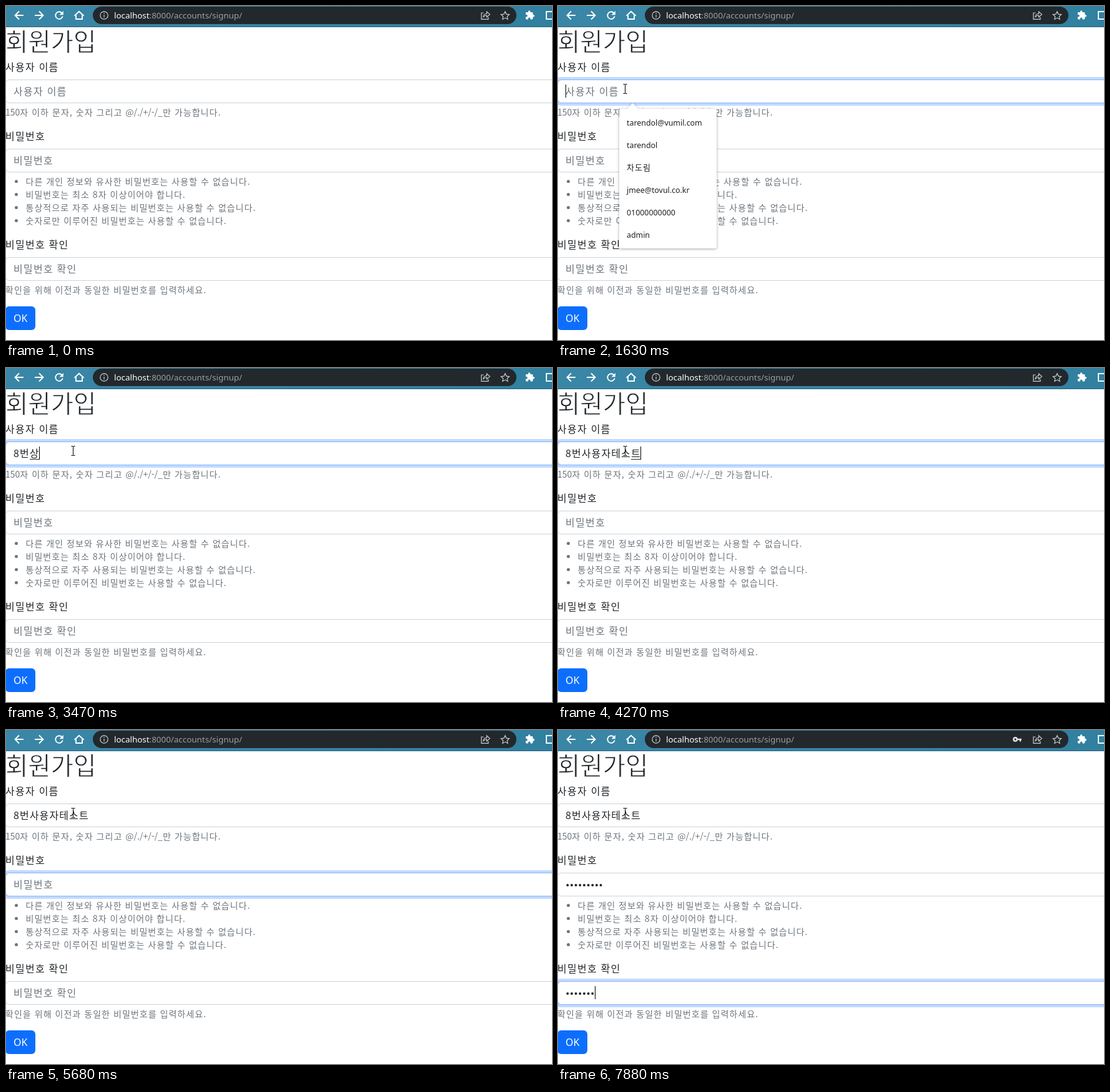
Animation of 874 by 536 pixels, one loop 8000 ms. Source, as an HTML page:

```html
<!DOCTYPE html>
<html lang="ko">
<head>
<meta charset="utf-8">
<title>회원가입</title>
<style>
  html, body { margin: 0; width: 100%; height: 100%; overflow: hidden; background: #fff; }
  svg { display: block; }
  text { font-family: "Noto Sans CJK KR", "Noto Sans CJK", sans-serif; white-space: pre; }
  /* the white outline thins the heavy strokes */
  .title { font-size: 39.5px; font-weight: 300; fill: #212529; stroke: #fff; stroke-width: .9; }
  .label, .hint, .value { font-size: 16px; letter-spacing: 1.25px; fill: #212529; }
  .hint { fill: #6c757d; }
  .value { letter-spacing: 1.1px; }
  .help { font-size: 14px; letter-spacing: 1.04px; fill: #6c757d; }
  .tight { letter-spacing: 0; }
  .latin { font-family: "Noto Sans", sans-serif; }
  .url { font-size: 13.4px; fill: #9aa0a6; }
  .item { font: 12.4px "Noto Sans", "Noto Sans CJK KR", sans-serif; fill: #202124; }
  .item.ko { font-size: 13px; letter-spacing: 1px; }
  .line { fill: none; stroke: #fff; stroke-width: 1.9; }
  .thin { fill: none; stroke: #c9cdd1; stroke-width: 1.2; }
  #menu { filter: drop-shadow(0 1px 2px rgba(0, 0, 0, .35)); }
</style>
</head>
<body>
<svg id="stage" width="874" height="536" viewBox="0 0 874 536">
  <defs>
    <linearGradient id="bar">
      <stop offset="0" stop-color="#3a86a6"/>
      <stop offset="1" stop-color="#31809f"/>
    </linearGradient>
  </defs>

  <g id="browser">
    <rect width="874" height="34" fill="url(#bar)"/>
    <rect y="33" width="874" height="1" fill="#24627c"/>
    <rect x="139" y="1" width="678" height="28" rx="14" fill="#22282c"/>
    <path class="line" d="M28 15H15M21 8.5L14.500 15l6.500 6.500M46 15h13M53 8.500l6.500 6.500-6.500 6.500"/>
    <path class="line" d="M89.500 11.300A5.800 5.800 0 1 0 90.700 16.500"/>
    <path d="M91.800 8v6.300h-6.300z" fill="#fff"/>
    <path class="line" d="M109.500 15.800L117 8.800l7.500 7M112 14.500V21h10v-6.500"/>
    <circle class="thin" cx="157" cy="15" r="6.2"/>
    <path class="thin" d="M157 14v4.500M157 11v1.600"/>
    <text class="latin url" x="173" y="20"><tspan fill="#fff">localhost</tspan>:8000/accounts/signup/</text>
    <path class="thin" d="M764.500 11H761v10.300h11V18M763.800 18.300c.5-4 2.700-6 5.700-6V9l5 4.500-5 4.500v-3c-2.500 0-4.300 1-5.700 3.300z"/>
    <path class="thin" d="M799 8.800l2 4.300 4.600.5-3.400 3.200.9 4.600-4.100-2.300-4.100 2.300.9-4.600-3.400-3.200 4.600-.5z"/>
    <path fill="#fff" transform="translate(830.5 6.5) scale(.68)" d="M20.500 11H19V7c0-1.100-.9-2-2-2h-4V3.500a2.500 2.500 0 0 0-5 0V5H4c-1.100 0-2 .9-2 2v3.800h1.500a2.700 2.700 0 0 1 0 5.400H2V20c0 1.100.9 2 2 2h3.800v-1.500a2.700 2.700 0 0 1 5.400 0V22H17c1.100 0 2-.9 2-2v-4h1.500a2.500 2.500 0 0 0 0-5z"/>
    <rect class="line" x="865" y="9" width="14" height="12"/>
    <g id="key" fill="none" stroke="#dfe2e5" stroke-width="2.4">
      <circle cx="732" cy="15" r="2.7"/>
      <path d="M735 15h7M740 15v3.500"/>
    </g>
  </g>

  <g id="page">
    <text class="title" x="-1" y="71.5">회원가입</text>
    <text class="help" x="-1" y="176"><tspan class="tight">150</tspan>자 이하 문자, 숫자 그리고 <tspan class="tight">@/./+/-/_</tspan>만 가능합니다.</text>
    <text class="help" x="-1" y="461">확인을 위해 이전과 동일한 비밀번호를 입력하세요.</text>
    <rect x="-1" y="482" width="48" height="38" rx="6" fill="#0d6efd"/>
    <text class="latin" x="12" y="507" font-size="16" fill="#fff">OK</text>
  </g>

  <g id="fields"></g>
  <rect id="under" y="146" width="15" height="1" fill="#212529"/>
  <rect id="caret" width="1" height="21" fill="#000"/>

  <g id="menu">
    <rect x="98" y="165" width="156" height="224" rx="3" fill="#fff"/>
    <path d="M110 165.500l9.500-9.500 9.500 9.500z" fill="#fff"/>
  </g>

  <path id="arrow" d="M0 0v16.500l3.800-3.600 2.500 5.800 2.400-1-2.500-5.700h5.300z" fill="#fff" stroke="#000"/>
  <path id="beam" d="M-3-7.500h2.500l.5.500.5-.5h2.500M0-7v14M-3 7.500h2.500l.5-.5.5.500h2.500" fill="none" stroke="#000"/>
</svg>

<script>
const $ = id => document.getElementById(id);
const LOOP = 8000, DOT = 6.65, LEFT = 12;

function add(parent, tag, attrs, text = '') {
  const el = document.createElementNS('http://www.w3.org/2000/svg', tag);
  for (const k in attrs) el.setAttribute(k, attrs[k]);
  el.textContent = text;
  return parent.appendChild(el);
}
const show = (el, on) => el.setAttribute('visibility', on ? 'visible' : 'hidden');

// Form fields
const fields = [['사용자 이름', 118], ['비밀번호', 229], ['비밀번호 확인', 403]].map(([name, y]) => {
  const g = $('fields');
  const box = { x: -.5, y: y + .5, width: 900, height: 37, rx: 5.5 };
  add(g, 'text', { class: 'label', x: -1, y: y - 14 }, name);
  add(g, 'rect', { ...box, fill: '#fff', stroke: '#ced4da' });
  const glow = add(g, 'g', { fill: 'none' });
  add(glow, 'rect', { x: -3, y: y - 2, width: 904, height: 42, rx: 8, stroke: '#0d6efd', 'stroke-opacity': .25, 'stroke-width': 4 });
  add(glow, 'rect', { ...box, stroke: '#86b7fe' });
  const hint = add(g, 'text', { class: 'hint', x: LEFT, y: y + 25 }, name);
  const value = add(g, 'text', { class: 'value', x: LEFT, y: y + 25 });
  const dots = Array.from({ length: 9 }, (_, i) =>
    add(g, 'circle', { cx: LEFT + DOT * (i + .5), cy: y + 20, r: 2, fill: '#212529' }));
  return { y, glow, hint, value, dots };
});

// Password rules
['다른 개인 정보와 유사한 비밀번호는 사용할 수 없습니다.',
 '비밀번호는 최소 8자 이상이어야 합니다.',
 '통상적으로 자주 사용되는 비밀번호는 사용할 수 없습니다.',
 '숫자로만 이루어진 비밀번호는 사용할 수 없습니다.'].forEach((rule, i) => {
  const y = 287 + 21 * i;
  add($('page'), 'circle', { cx: 16.5, cy: y - 5.5, r: 2.5, fill: '#6c757d' });
  add($('page'), 'text', { class: 'help', x: 31.5, y }, rule);
});

['tarendol@vumil.com', 'tarendol', '차도림', 'jmee@tovul.co.kr', '01000000000', 'admin'].forEach((s, i) =>
  add($('menu'), 'text', { class: /[가-힣]/.test(s) ? 'item ko' : 'item', x: 110, y: 192 + 36 * i }, s));

// Each step changes only the listed parts of the state.
const start = { mouse: null, beam: false, glow: [0, 0, 0], focus: -1, name: '', compose: false, dots: [0, 0, 0], key: false, menu: false, caret: true };
const steps = [
  [0, {}],
  [600, { mouse: [380, 366] }],
  [800, { mouse: [215, 222] }],
  [1020, { mouse: [107, 133], beam: true }],
  [1430, { focus: 0, glow: [.7, 0, 0] }],
  [1630, { glow: [1, 0, 0], menu: true }],
  [2030, { name: '8', menu: false }],
  [2230, { name: '8ㅂ', compose: true }],
  [2430, { name: '8버' }],
  [2830, { name: '8번' }],
  [3030, { name: '8번ㅅ' }],
  [3270, { name: '8번사' }],
  [3470, { name: '8번상' }],
  [3670, { name: '8번사용' }],
  [3870, { name: '8번사용자테' }],
  [4070, { name: '8번사용자테스' }],
  [4270, { name: '8번사용자테스트' }],
  [4470, { compose: false }],
  [4670, { focus: 1, glow: [.15, .7, 0] }],
  [4870, { glow: [0, 1, 0] }],
  [5280, { dots: [0, 1, 0], key: true }],
  [5680, { dots: [0, 0, 0], key: false, caret: false }],
  [5880, { dots: [0, 1, 0], key: true, caret: true }],
  [6080, { dots: [0, 3, 0] }],
  [6280, { dots: [0, 4, 0] }],
  [6480, { dots: [0, 6, 0] }],
  [6680, { dots: [0, 8, 0] }],
  [6880, { dots: [0, 9, 0] }],
  [7280, { focus: 2, glow: [0, .15, .7] }],
  [7480, { glow: [0, 0, 1], dots: [0, 9, 2] }],
  [7680, { dots: [0, 9, 5] }],
  [7880, { dots: [0, 9, 7] }]
];
let state = start;
const states = steps.map(([time, change]) => ({ time, ...(state = { ...state, ...change }) }));

function draw(s) {
  fields.forEach((f, i) => {
    f.glow.setAttribute('opacity', s.glow[i]);
    f.value.textContent = i ? '' : s.name;
    show(f.hint, !f.value.textContent && !s.dots[i]);
    f.dots.forEach((dot, n) => show(dot, n < s.dots[i]));
  });

  const field = fields[s.focus];
  show($('caret'), field && s.caret);
  show($('under'), s.compose);
  if (field) {
    const len = s.focus ? s.dots[s.focus] * DOT : Math.max(0, field.value.getComputedTextLength() - 1);
    const x = Math.round(LEFT + len);
    $('caret').setAttribute('x', x);
    $('caret').setAttribute('y', field.y + 8);
    $('under').setAttribute('x', x - 15);
  }

  show($('key'), s.key);
  show($('menu'), s.menu);
  show($('arrow'), s.mouse && !s.beam);
  show($('beam'), s.mouse && s.beam);
  if (s.mouse) {
    const [x, y] = s.mouse;
    for (const id of ['arrow', 'beam']) $(id).setAttribute('transform', `translate(${x + .5} ${y})`);
  }
}

const begin = performance.now();
let current;
function tick() {
  const t = (performance.now() - begin) % LOOP;
  const next = states.findLast(s => s.time <= t);
  if (next !== current) draw(current = next);
  requestAnimationFrame(tick);
}
tick();
</script>
</body>
</html>
```
